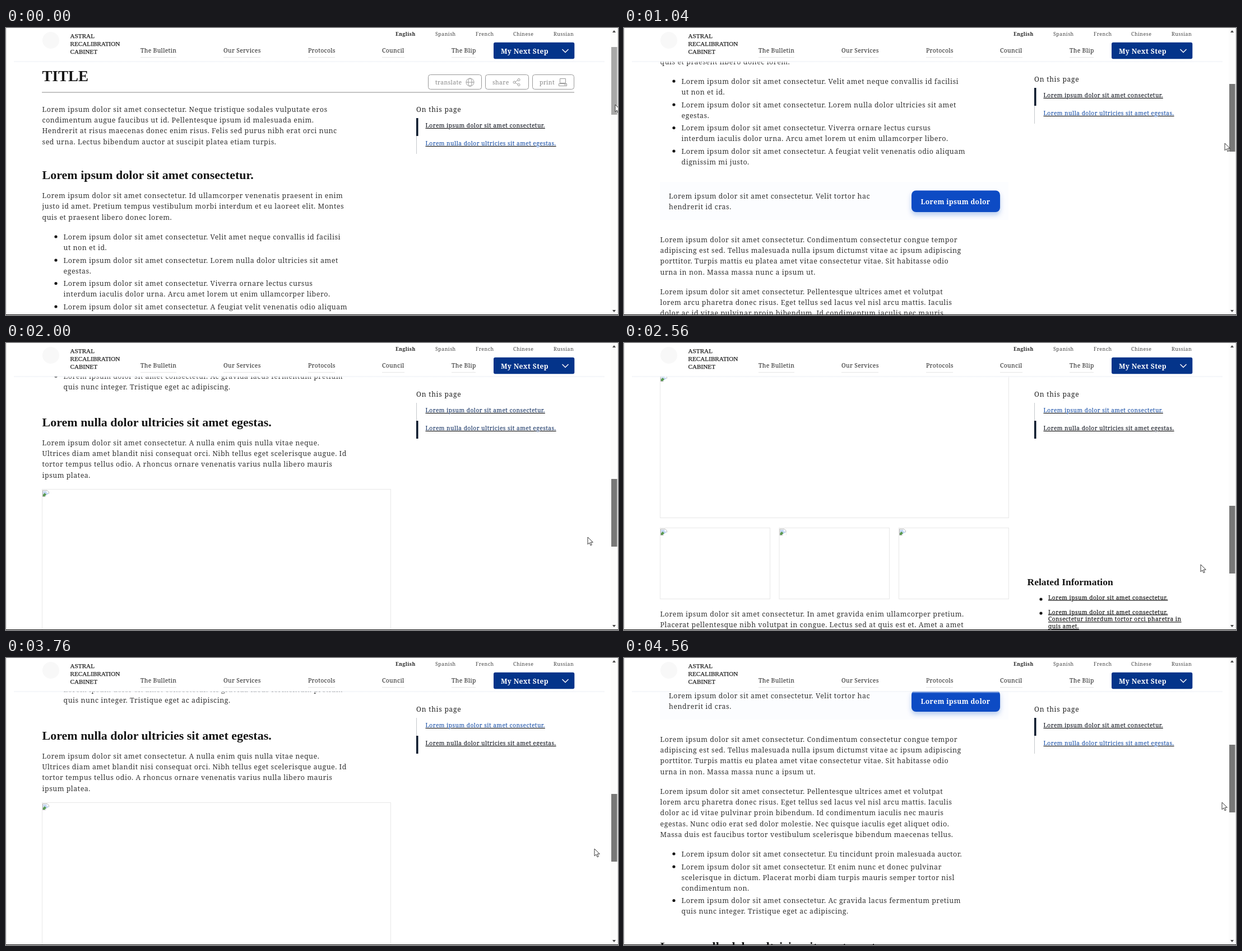
An HTML page that plays this animation: 1092x513 px, repeating every 4.64 s.

```html
<!DOCTYPE html>
<html lang="en">
<head>
<meta charset="utf-8">
<title>Scrolling article</title>
<style>
  html, body { margin: 0; width: 100%; height: 100%; overflow: hidden; background: #fff; }
  svg { display: block; width: 100%; height: 100%; }
  text { font-family: "Noto Serif", serif; fill: #333; white-space: pre; }
  .body { font-size: 12.4px; letter-spacing: .54px; }
  .head, .title, .related { font-family: "Liberation Serif", serif; font-weight: 700; fill: #151515; }
  .head { font-size: 22px; }
  .title { font-size: 27px; }
  .related { font-size: 17.5px; }
  .brand { font: 11.2px "Liberation Serif", serif; fill: #222; stroke: #222; stroke-width: .25px; }
  .nav { font-size: 10.4px; letter-spacing: .33px; fill: #222; }
  .lang { font-size: 8.8px; letter-spacing: .5px; fill: #444; }
  .strong { font-weight: 700; letter-spacing: .4px; fill: #222; }
  .tool { font-size: 10.4px; letter-spacing: .4px; fill: #888; }
  .button { font-size: 12.1px; letter-spacing: .35px; font-weight: 700; fill: #fff; }
  .aside { font-size: 12px; letter-spacing: .8px; fill: #222; }
  .link { font-size: 10.2px; letter-spacing: .47px; fill: inherit; }
  .outline { fill: none; stroke: #999; stroke-width: 1; }
  .frame { fill: none; stroke: #e8e8e8; stroke-width: 1; }
</style>
</head>
<body>
<svg viewBox="0 0 1092 513" preserveAspectRatio="none">
  <defs>
    <filter id="soft" x="-20%" y="-40%" width="140%" height="200%">
      <feDropShadow dx="0" dy="5" stdDeviation="4.5" flood-color="#114bc4" flood-opacity=".28"/>
    </filter>
    <linearGradient id="shade" x1="0" y1="0" x2="0" y2="1">
      <stop offset="0" stop-color="#eef1f6"/>
      <stop offset="1" stop-color="#fff" stop-opacity="0"/>
    </linearGradient>
    <g id="broken">
      <path d="M1.5 1.5h8l3 3v8h-11z" fill="#fff" stroke="#b5b5b5"/>
      <path d="M2.5 3h6v3h3v2l-4 2-2 2h-3z" fill="#c3d6f3"/>
      <path d="M2 12v-3l3-3 3 3-3 3z" fill="#5a9a50"/>
      <path d="M6 13l7-6v6z" fill="#fff"/>
    </g>
  </defs>
  <rect width="1092" height="513" fill="#fff"/>
  <g id="page"></g>
  <g id="aside"></g>
  <g id="header"></g>
  <g id="scrollbar">
    <rect x="1079" width="12" height="512" fill="#fcfcfc"/>
    <path d="M1082 8l3-4 3 4zM1082 504l3 4 3-4z" fill="#444"/>
    <rect id="thumb" x="1080" width="10.5" height="121"/>
  </g>
  <path d="M.5 0v512" stroke="#ddd"/>
  <path d="M1091.5 0v512" stroke="#e4e4e4"/>
  <rect y="512" width="1092" height="1" fill="#111"/>
  <path id="cursor" d="M0 0v12.800l3-2.800 2.100 4.800 2.100-.9-2.100-4.700h4.200z" fill="#fff" stroke="#222" stroke-width=".9"/>
</svg>
<script>
const $ = id => document.getElementById(id);
const LINE = 19.35;
const text = (x, y, style, s) => `<text x="${x}" y="${y}" class="${style}">${s}</text>`;
const lines = (x, y, copy, style = 'body', pitch = LINE) =>
  copy.split('|').map((s, i) => text(x, y + i * pitch, style, s)).join('');
const bullet = (x, y) => `<circle cx="${x}" cy="${y}" r="2.6" fill="#151515"/>`;
const item = (y, copy) => bullet(89, y - 4.5) + lines(102.5, y, copy);
const box = (x, y, w, h, r, rest) =>
  `<rect x="${x}" y="${y}" width="${w}" height="${h}" rx="${r}" ${rest}/>`;
const picture = (x, y, w, h) =>
  box(x + .5, y + .5, w, h, 0, 'class="frame"') + `<use href="#broken" x="${x}" y="${y + 1}"/>`;
const tool = (x, w, label) =>
  box(x + .5, 83.5, w, 26, 4, 'class="outline"') + text(x + 13, 101, 'tool', label);

const LOREM = 'Lorem ipsum dolor sit amet consectetur.';
const NULLA = 'Lorem nulla dolor ultricies sit amet egestas.';

$('page').innerHTML = [
  text(64.5, 95, 'title', 'TITLE'),
  tool(753, 95, 'translate'), tool(855, 77, 'share'), tool(939, 74, 'print'),
  `<g class="outline">
    <circle cx="828" cy="97" r="7"/><ellipse cx="828" cy="97" rx="3.2" ry="7"/><path d="M821 97h14"/>
    <circle cx="907" cy="97" r="2"/><circle cx="915" cy="92.5" r="2"/><circle cx="915" cy="101.5" r="2"/>
    <path d="M909 96l4-2.5M909 98l4 2.5"/>
    <path d="M988.5 90.5h10v8h-10zM986.5 99.5h14v4h-14zM996 101.5h3"/>
  </g>`,
  '<path d="M64 115h950" stroke="#8a8a8a"/>',
  lines(64.5, 149.5, `${LOREM} Neque tristique sodales vulputate eros|condimentum augue faucibus ut id. Pellentesque ipsum id malesuada enim.|Hendrerit at risus maecenas donec enim risus. Felis sed purus nibh erat orci nunc|sed urna. Lectus bibendum auctor at suscipit platea etiam turpis.`),
  text(64.5, 270, 'head', LOREM),
  lines(64.5, 304, `${LOREM} Id ullamcorper venenatis praesent in enim|justo id amet. Pretium tempus vestibulum morbi interdum et eu laoreet elit. Montes|quis et praesent libero donec lorem.`),
  item(377.5, `${LOREM} Velit amet neque convallis id facilisi|ut non et id.`),
  item(419.5, `${LOREM} Lorem nulla dolor ultricies sit amet|egestas.`),
  item(461, `${LOREM} Viverra ornare lectus cursus|interdum iaculis dolor urna. Arcu amet lorem ut enim ullamcorper libero.`),
  item(502.5, `${LOREM} A feugiat velit venenatis odio aliquam|dignissim mi justo.`),
  box(64, 553, 622, 68, 0, 'fill="#fcfdff"'),
  lines(80, 583, `${LOREM} Velit tortor hac|hendrerit id cras.`),
  box(513, 568.5, 158, 38.5, 8, 'fill="#114bc4" filter="url(#soft)"'),
  text(529.5, 592.5, 'button', 'Lorem ipsum dolor'),
  lines(64.5, 660.5, `${LOREM} Condimentum consectetur congue tempor|adipiscing est sed. Tellus malesuada nulla ipsum dictumst vitae ac ipsum adipiscing|porttitor. Turpis mattis eu platea amet vitae consectetur vitae. Sit habitasse odio|urna in non. Massa massa nunc a ipsum ut.`),
  lines(64.5, 753.5, `${LOREM} Pellentesque ultrices amet et volutpat|lorem arcu pharetra donec risus. Eget tellus sed lacus vel nisl arcu mattis. Iaculis|dolor ac id vitae pulvinar proin bibendum. Id condimentum iaculis nec mauris|egestas. Nunc odio erat sed dolor molestie. Nec quisque iaculis eget aliquet odio.|Massa duis est faucibus tortor vestibulum scelerisque bibendum maecenas tellus.`),
  item(865.5, `${LOREM} Eu tincidunt proin malesuada auctor.`),
  item(888.5, `${LOREM} Et enim nunc et donec pulvinar|scelerisque in dictum. Placerat morbi diam turpis mauris semper tortor nisl|condimentum non.`),
  item(949, `${LOREM} Ac gravida lacus fermentum pretium|quis nunc integer. Tristique eget ac adipiscing.`),
  text(64.5, 1034, 'head', NULLA),
  lines(64.5, 1067.5, `${LOREM} A nulla enim quis nulla vitae neque.|Ultrices diam amet blandit nisi consequat orci. Nibh tellus eget scelerisque augue. Id|tortor tempus tellus odio. A rhoncus ornare venenatis varius nulla libero mauris|ipsum platea.`),
  picture(64, 1146, 622, 257),
  picture(64, 1421, 196, 127), picture(276.5, 1421, 196.5, 127), picture(490, 1421, 196, 127),
  lines(64.5, 1579.5, `${LOREM} In amet gravida enim ullamcorper pretium.|Placerat pellentesque nibh volutpat in congue. Lectus sed at quis est et. Amet a amet|tempus sed eros in. Ut rhoncus a blandit varius vulputate. Sodales tellus sit sit amet.|Turpis diam mauris duis consequat at sit.`),
  text(719.5, 1523.5, 'related', 'Related Information'),
  bullet(744, 1549), bullet(744, 1574), bullet(744, 1619),
  '<g fill="#1a1a1a" stroke="#1a1a1a" stroke-width=".2" style="text-decoration:underline;text-underline-offset:2px">',
  text(757, 1549.5, 'link', LOREM),
  lines(757, 1575.5, `${LOREM}|Consectetur interdum tortor orci pharetra in|quis amet.`, 'link', 12.8),
  lines(757, 1620.5, `${LOREM}|Rhoncus pulvinar faucibus ante sed.`, 'link', 12.8),
  '</g>'
].join('');

$('aside').innerHTML =
  text(732, 149.5, 'aside', 'On this page') +
  '<path d="M732.5 161v64" stroke="#c4c8cc"/>' +
  box(732, 161, 3.5, 32, 0, 'id="marker" fill="#0d1a2d"') +
  '<g stroke-width=".15" style="text-decoration:underline;text-underline-offset:2.5px">' +
  `<g id="first">${text(748.5, 178, 'link', LOREM)}</g>` +
  `<g id="second">${text(748.5, 210, 'link', NULLA)}</g></g>`;

const menu = [[240, 304, 'The Bulletin'], [388, 454, 'Our Services'], [539, 587, 'Protocols'],
  [671, 711, 'Council'], [795, 838, 'The Blip']];
const languages = [[766, 'Spanish'], [838, 'French'], [905, 'Chinese'], [977, 'Russian']];

$('header').innerHTML = [
  box(0, 0, 1092, 59, 0, 'fill="#fff"'),
  box(14, 59, 1054, 4, 0, 'fill="url(#shade)"'),
  '<circle cx="80" cy="22" r="15" fill="#f8f8f8"/>',
  lines(114.5, 18, 'ASTRAL|RECALIBRATION|CABINET', 'brand', 14),
  ...menu.map(([x, end, s]) =>
    text(x, 43.5, 'nav', s) + `<path d="M${x} 52.5H${end}" stroke="#e6e6e6"/>`),
  text(695, 14, 'lang strong', 'English'),
  ...languages.map(([x, s]) => text(x, 14, 'lang', s)),
  box(870, 25.8, 144.3, 29.4, 3, 'fill="#04348a"'),
  text(883, 45.5, 'button', 'My Next Step'),
  '<path d="M992.5 38l5.5 5.5 5.5-5.5" fill="none" stroke="#fff" stroke-width="1.4"/>'
].join('');

// Smooth curve through [time, value] points, at rest at both ends.
function curve(points) {
  const slope = points.map((_, i) => {
    const a = points[i - 1], b = points[i + 1];
    return a && b ? (b[1] - a[1]) / (b[0] - a[0]) : 0;
  });
  return t => {
    if (t <= points[0][0]) return points[0][1];
    const i = points.findIndex(p => p[0] >= t);
    if (i < 0) return points[points.length - 1][1];
    const [t0, v0] = points[i - 1], [t1, v1] = points[i];
    const d = t1 - t0, u = (t - t0) / d, w = 1 - u;
    return v0 * w * w * (1 + 2 * u) + v1 * u * u * (3 - 2 * u)
      + d * u * w * (slope[i - 1] * w - slope[i] * u);
  };
}

const scrollAt = curve([[160, 0], [640, 89], [1360, 460], [2000, 885], [3040, 1165], [3760, 888], [4560, 511]]);
const mouseX = curve([[0, 1087], [640, 1085], [1360, 1059], [2000, 1038], [3040, 1027], [3760, 1050], [4560, 1067]]);
const mouseY = curve([[160, 137], [640, 159], [1360, 251], [2000, 347], [3040, 413], [3760, 341], [4560, 258]]);

const DURATION = 4640, STEP = 80, PRESS = 160, ENTER = 1920, LEAVE = 3840, FADE = 160;
const DARK = [26, 30, 40], BLUE = [36, 88, 172];
const clamp = v => Math.min(1, Math.max(0, v));
const mix = k => `rgb(${DARK.map((c, i) => Math.round(c + (BLUE[i] - c) * k))})`;
const move = (id, x, y) => $(id).setAttribute('transform', `translate(${x} ${y})`);

function tint(id, color) {
  $(id).setAttribute('fill', color);
  $(id).setAttribute('stroke', color);
}

function draw(t) {
  const scroll = Math.round(scrollAt(t));
  move('page', 0, -scroll);
  move('aside', 0, -Math.min(scroll, 54));
  move('cursor', Math.round(mouseX(t)), Math.round(mouseY(t)));
  $('thumb').setAttribute('y', Math.round(33.92 + scroll * .236));
  $('thumb').setAttribute('fill', t < PRESS ? '#a8a8a8' : '#787878');
  const fade = clamp((t - ENTER) / FADE) - clamp((t - LEAVE) / FADE);
  tint('first', mix(fade));
  tint('second', mix(1 - fade));
  $('marker').setAttribute('y', t >= ENTER && t < LEAVE ? 193 : 161);
}

const start = performance.now();
function tick() {
  const t = (performance.now() - start) % DURATION;
  draw(Math.floor(t / STEP) * STEP);
  requestAnimationFrame(tick);
}
tick();
</script>
</body>
</html>
```
